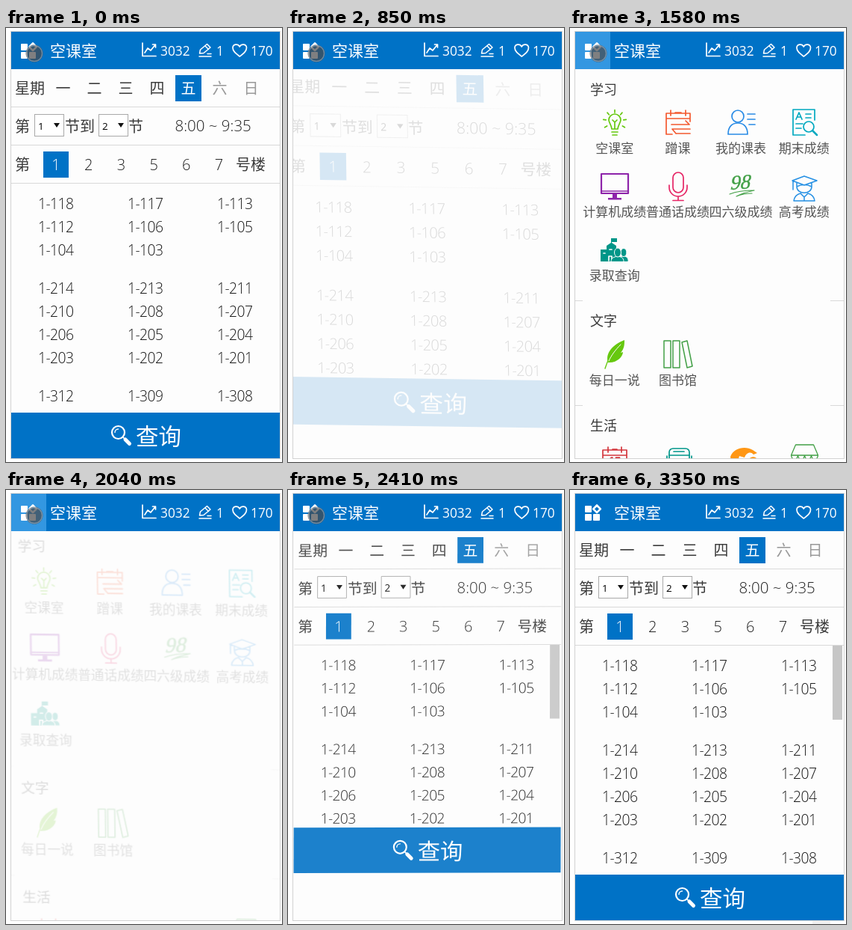
Recreate the animation shown at these times as an HTML page. Size 370 by 580 pixels, loop 3690 ms.

```html
<!DOCTYPE html>
<html lang="zh-CN">
<head>
<meta charset="utf-8">
<title>空课室</title>
<style>
html, body { margin: 0; width: 100%; height: 100%; overflow: hidden; background: #fff; }
svg { display: block; width: 370px; height: 580px; }
text { font-family: "Open Sans", "Noto Sans CJK SC", "Noto Sans CJK", sans-serif; font-weight: 300; white-space: pre; }
.ln { stroke: #d9d9d9; stroke-width: 1; }
.ico { fill: none; stroke-width: 1.7; stroke-linecap: round; stroke-linejoin: round; }
.room text { letter-spacing: -.6px; }
</style>
</head>
<body>
<svg id="stage" viewBox="0 0 370 580" xmlns="http://www.w3.org/2000/svg">
  <defs><clipPath id="view"><rect x="7" y="55" width="360" height="520"/></clipPath></defs>
  <rect width="370" height="580" fill="#fff"/>
  <rect x="6.5" y="4.5" width="361" height="571" fill="#fdfdfd" stroke="#d2d2d2"/>
  <g clip-path="url(#view)">
    <g id="menu"></g>
    <g id="list"></g>
  </g>
  <g id="head"></g>
  <g id="cursor">
    <circle r="11.500" fill="#48484a" fill-opacity=".7"/>
    <circle r="10.500" fill="none" stroke="#b4c8da" stroke-opacity=".45" stroke-width="1.500"/>
  </g>
  <rect id="trace" x="325" y="576" width="24" height="4" fill="#f1f1f1"/>
</svg>
<script>
const LOOP = 3690, BLUE = '#0072c6', INK = '#3a3a3a';
const $ = id => document.getElementById(id);

// y is the vertical middle of the glyphs
const text = (x, y, s, size, fill = INK, anchor = 'start', weight = 300) =>
  `<text x="${x}" y="${y + size * 0.37}" font-size="${size}" fill="${fill}" text-anchor="${anchor}" style="font-weight:${weight}">${s}</text>`;
const mid = (x, y, s, size, fill, weight) => text(x, y, s, size, fill, 'middle', weight);
const rect = (x, y, w, h, fill, more = '') =>
  `<rect x="${x}" y="${y}" width="${w}" height="${h}" fill="${fill}" ${more}/>`;
const line = (y, x1 = 7, x2 = 367) => `<path class="ln" d="M${x1} ${y}H${x2}"/>`;
const icon = (x, y, color, body) =>
  `<g class="ico" transform="translate(${x} ${y})" stroke="${color}" color="${color}">${body}</g>`;
const path = (d, more = '') => `<path d="${d}" ${more}/>`;
const SOLID = 'fill="currentColor" stroke="none"';

function buildHead() {
  const white = (d, w = 1.7) => path(d, `class="ico" stroke="#fff" style="stroke-width:${w}"`);
  const label = (x, y, s, size) => text(x, y, s, size, '#fff', 'start', 400);
  $('head').innerHTML =
    rect(7, 5, 360, 50, BLUE) + rect(7, 5, 47, 50, '#3397e1', 'id="active"') +
    rect(20, 21, 9, 9, '#fff', 'rx="1"') + rect(20, 32, 9, 9, '#fff', 'rx="1"') +
    rect(31, 32, 9, 9, '#fff', 'rx="1"') + white('M36 20.5l4.8 4.8-4.8 4.8-4.8-4.8z', 2.6) +
    label(59, 30, '空课室', 21) +
    white('M183 20V37.5H201M186 33l4-6 4 3 6-7.5M196.500 22h4v4') + label(207, 30.5, '3032', 17.3) +
    white('M259.500 34l1-5 9-7.500 4.500 4.500-9 7.500zM267 24l4.500 4.500M259 38h16M270 34.500h5', 1.5) +
    label(282, 30.5, '1', 17.3) +
    white('M313.300 38C308 34 304 31 304 26.500C304 21.500 311 20.500 313.300 25C315.500 20.500 322.500 21.500 322.500 26.500C322.500 31 318.500 34 313.300 38z') +
    label(328, 30.5, '170', 17.3);
}

function buildList() {
  const rooms = [
    [235, '118', '117', '113'], [266, '112', '106', '105'], [297, '104', '103'],
    [348, '214', '213', '211'], [379, '210', '208', '207'],
    [410, '206', '205', '204'], [441, '203', '202', '201'], [492, '312', '309', '308']
  ];
  const select = (x, n) =>
    rect(x + .5, 115.5, 39, 29, '#fff', 'stroke="#a9a9a9"') +
    text(x + 5, 131, n, 13.5, '#000', 'start', 400) +
    path(`M${x + 26} 127h8l-4 6z`, 'fill="#111"');
  let s = text(12, 80.6, '星期', 20);
  [...'一二三四五六日'].forEach((d, i) => {
    const on = i === 4;
    if (on) s += rect(227, 63, 35, 35, BLUE);
    s += mid(76.5 + i * 42, 80.6, d, 20, on ? '#fff' : i > 4 ? '#999' : INK);
  });
  s += line(105.5) + text(12, 131.6, '第', 20) + select(38, '1') + text(79, 131.6, '节到', 20) +
    select(124, '2') + text(164, 131.6, '节', 20) + text(226.5, 130.6, '8:00 ~ 9:35', 20.5, '#222') +
    line(156.5) + text(12, 182.6, '第', 20) + rect(50, 165, 34, 35, BLUE);
  [...'123567'].forEach((n, i) => s += mid(67 + i * 43.7, 182.5, n, 20, i ? '#222' : '#fff'));
  s += text(308, 182.6, '号楼', 20) + line(207.5);
  for (const [y, ...row] of rooms) {
    const r = row.map((n, i) => mid(66.7 + i * 120, y - .5, '1-' + n, 19.3, '#181818')).join('');
    s += `<g class="room" ${y > 450 ? 'id="extra"' : ''}>${r}</g>`;
  }
  s += rect(352, 208, 13, 99, '#c6c6c6', 'id="thumb"');
  s += `<g id="bar">${rect(7, 514, 360, 61, BLUE)}
    <g class="ico" stroke="#fff"><circle cx="150.500" cy="540.500" r="8.500" stroke-width="2.200"/>
    <path d="M146 540.500a4.500 4.500 0 0 1 4.500-4.500" stroke-width="1.400"/>
    <path d="M157 547l2 2"/><path d="M160 550l5.500 5.500" stroke-width="5"/></g>
    ${text(174, 546, '查询', 30.5, '#fff')}</g>`;
  $('list').innerHTML = s;
}

function buildMenu() {
  const label = (col, y, s) => mid(59.7 + col * 84.7, y - .4, s, 17, '#555');
  let s = text(27, 82, '学习', 18) + text(27, 391.5, '文字', 18) + text(27, 531.5, '生活', 18);
  [['空课室', '蹭课', '我的课表', '期末成绩'], ['计算机成绩', '普通话成绩', '四六级成绩', '高考成绩'], ['录取查询']]
    .forEach((row, r) => row.forEach((n, c) => s += label(c, 161 + r * 85, n)));
  s += label(0, 471, '每日一说') + label(1, 471, '图书馆');

  // bulb with rays
  let rays = '';
  for (let a = -210; a <= 30; a += 40) rays += `<path d="M12 0h3.500" transform="translate(0 -1) rotate(${a})"/>`;
  s += icon(60, 126, '#66c80f', rays +
    path('M-4 9C-4 5-8-0-8-3A8 8 0 0 1 8-3C8 0 4 5 4 9zM-4 13h8M-3 17h6M-3-3l3 3 3-3M0 0v8'));
  // calendar with arrows
  s += icon(145, 126, '#f4592f',
    path('M16-1v-11h-32v28h8M-16-5h32M-10-16v7M10-16v7M-4-13h8M-9 3h24l-5-5M16 9h-24l5 6M-3 15h19'));
  // person with lines
  s += icon(230, 126, '#2a8ce6',
    '<circle cx="-5" cy="-8" r="8"/>' + path('M-18 16C-18 5-12 1-5 1S8 5 8 16zM8-11h10M8-4h10M10 3h8'));
  // report with lens
  s += icon(314, 126, '#00a9c0', path('M14-3v-14h-29v34h16M-11-4l4-9 4 9M-9.500-7h5M2-11h7M2-6h7M-11 2h9M-11 8h7') +
    '<circle cx="6" cy="6" r="7"/>' + path('M11 11l6 6', 'stroke-width="2.500"'));
  // monitor
  s += icon(60, 212, '#8e24aa', path('M-18-17h36v26h-36z', 'stroke-width="2.200"') +
    path('M-18 6h36') + path('M-3 10h6v5h6v2.500h-18v-2.500h6z', SOLID));
  // microphone
  s += icon(145, 212, '#e62565',
    '<rect x="-7" y="-19" width="14" height="27" rx="7"/>' + path('M-12-2v3a12 12 0 0 0 24 0v-3M0 13v5M-7 18.500h14'));
  // score
  s += `<g transform="translate(229 207) rotate(-4) skewX(-8)"><text y="8" font-size="27" text-anchor="middle" fill="#43a047"
    style="font-family:'Liberation Serif',serif;font-weight:400;font-style:italic" stroke="#43a047" stroke-width=".5">98</text></g>` +
    icon(230, 219, '#43a047', path('M-16 3C-6-1 6-2 17-2C8 0 0 2-7 6C0 3 8 2 14 2', 'stroke-width="1.200"'));
  // graduate
  s += icon(314, 213, '#2590e4',
    path('M-16-9L0-15 17-9 0-3zM-10-6v5C-10 10 10 10 10-1v-5M-15-8v11M-10-1C-4-4 4-4 10-1M-14 18C-13 11-9 9-5 8L0 13 5 8C9 9 13 11 14 18zM0 13v4', 'stroke-width="1.500"'));
  // school
  s += icon(60, 297, '#009688',
    path('M-19-1h8v-5l6-4v-6h8v5h-7v1l6 4v21h-21z', SOLID) +
    path('M-8 14v-6h4v6M-15 4h2M-7-1h3', 'stroke="#fdfdfd"') +
    `<g fill="currentColor" stroke="#fdfdfd" stroke-width="1"><path d="M5 15C5 9 9 8 12 8s7 2 6 7z"/><ellipse cx="12" cy="3" rx="4" ry="5.500"/>
     <path d="M-5 15C-5 10-1 9 4 8C9 9 12 10 12 15z"/><ellipse cx="4" cy="3" rx="4.500" ry="6"/></g>`);
  // feather
  s += icon(60, 436, '#66c80f',
    path('M13-19C-3-13-13-1-9 11C3 12 11 3 11-3L8-2C13-8 13-13 13-19z', SOLID) +
    path('M-13 19C-10 8-3-3 7-12', 'stroke-width="1.400"') + path('M-8 9C-5 2 1-6 8-13', 'stroke="#fdfdfd" stroke-width="1"'));
  // books
  s += icon(145, 436, '#43a047',
    path('M-19-18h9v36h-9zM-7-18h9v36h-9zM5-16l7-2 7 34-7 2z', 'stroke-width="1.500"'));
  // lower row, cut off by the edge
  s += icon(60, 576, '#d3363c', path('M-16-12h32v28h-32zM-16-5h32M-9-16v7M9-16v7M-3-13h6') +
      mid(0, 3, '15', 14, '#d3363c', 400)) +
    icon(146, 578, '#00968a', '<rect x="-13" y="-16" width="27" height="32" rx="5"/>' + path('M-16-6v8M17-6v8M-7-12h14M-13-7h27')) +
    icon(233, 577, '#ff9715', path('M-18-4C-14-16 2-19 12-13L18-9 13-7C9-12 3-9 1-3L-6-5-8 2-17 3z', SOLID) +
      path('M5 2C8-5 15-5 18-1V4H5z', SOLID)) +
    icon(314.5, 575, '#43a047', path('M-12-18h24l6 14h-36zM-18-4C-17 3-10 3-9-4C-8 3-1 3 0-4C1 3 8 3 9-4C10 3 17 3 18-4M-14 2v14h28v-14', 'stroke-width="1.300"'));

  for (const y of [364.5, 504.5])
    s += line(y, 7, 17) + line(y, 349, 367) + `<g class="mid">${line(y, 17, 349)}</g>`;
  $('menu').innerHTML = s;
}

buildHead();
buildList();
buildMenu();
const inner = document.querySelectorAll('.mid');

const clamp = v => Math.min(1, Math.max(0, v));
const span = (t, from, length) => clamp((t - from) / length);
const bez = (u, a, b) => 3 * (1 - u) * (1 - u) * u * a + 3 * (1 - u) * u * u * b + u * u * u;
// the CSS "ease" curve
function ease(x) {
  let lo = 0, hi = 1;
  for (let i = 0; i < 30; i++) {
    const u = (lo + hi) / 2;
    if (bez(u, .25, .25) < x) lo = u; else hi = u;
  }
  return x <= 0 ? 0 : x >= 1 ? 1 : bez(lo, .1, 1);
}
const show = (el, on) => { el.style.display = on ? '' : 'none'; };

// q: -1 before entering, 0 at rest, 1 after leaving
function pose(el, q, cy) {
  const cx = 187, s = 1 + .05 * q, k = Math.tan(q * Math.PI / 180);
  show(el, Math.abs(q) < 1);
  el.setAttribute('opacity', 1 - Math.abs(q));
  el.setAttribute('transform', q
    ? `matrix(${s} ${k} ${k} ${s} ${cx - s * cx - k * cy} ${cy - k * cx - s * cy + 10 * q})` : '');
}

function draw(t) {
  const listQ = t < 2240 ? ease(span(t, 740, 200)) : ease(span(t, 2170, 400)) - 1;
  const menuQ = t < 1920 ? ease(span(t, 940, 400)) - 1 : ease(span(t, 1935, 200));
  const compact = t >= 740 && t < 2740;
  pose($('list'), listQ, 284);
  pose($('menu'), menuQ, 395);
  show($('extra'), !compact);
  $('bar').setAttribute('transform', compact ? 'translate(0 -61)' : '');
  show($('thumb'), t >= 2170);
  show($('active'), t >= 940 && t < 2240);
  inner.forEach(el => show(el, t < 1580));

  const m = span(t, 2870, 480), k = m * m * (3 - 2 * m);
  $('cursor').setAttribute('transform', `translate(${38 + 299 * k} ${34 + 553 * k})`);
  show($('cursor'), m < 1);
  show($('trace'), m >= 1);
}

const start = performance.now();
function tick() {
  draw((performance.now() - start) % LOOP);
  requestAnimationFrame(tick);
}
tick();
</script>
</body>
</html>
```
